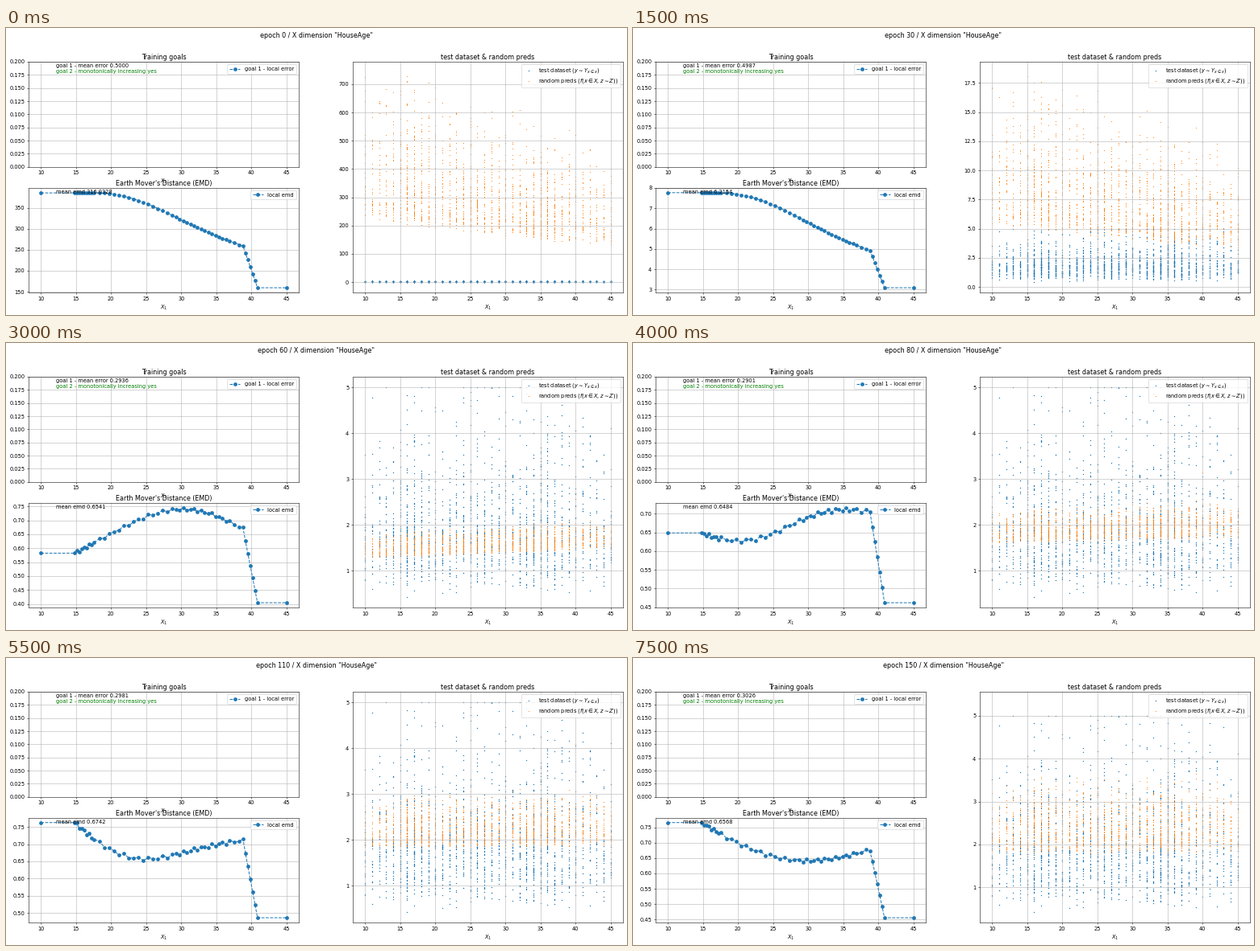
These frames come from a looping animation (770x357 px, 8000 ms). A matplotlib script:

```python
import numpy as np
import matplotlib.pyplot as plt
from matplotlib.animation import FuncAnimation

W, H, DPI = 770, 357, 48
FRAMES, STEP = 16, 10

# key epochs of the training run
KEYS = [0, 20, 30, 40, 60, 90, 130, 150]
ERROR = [.5, .4996, .4987, .4663, .2936, .2883, .3078, .3026]
EMD = [316.0328, 8.639, 6.2154, 1.3053, .6541, .6456, .7040, .6568]

# shape of the local EMD curve, relative to its mean
LEFT = [1.22, 1.25, 1.25, .965, .89, 1.055, 1.207, 1.165]
RIGHT = [.82, .793, .793, .99, 1.025, 1.12, .99, 1.03]
BEND = [.08, .085, .085, .12, .155, -.11, -.118, -.112]
WAVE = [.03, .033, .033, -.01, -.02, -.048, -.01, 0]
END = [.505, .498, .498, .555, .618, .759, .684, .694]

# predictions: centre, change with age, log spread
CENTRE = [280, 8.85, 6.95, .63, 1.58, 2.12, 2.35, 2.35]
TILT = [-.27, -.25, -.25, .11, .075, .02, 0, 0]
SPREAD = [.33, .33, .33, .20, .09, .10, .15, .17]


def at(values, epoch):
    return np.interp(epoch, KEYS, values)


def log_at(values, epoch):
    return np.exp(at(np.log(values), epoch))


def bump(x, centre, width):
    return np.exp(-((x - centre) / width) ** 2 / 2)


# markers sit at the means of sliding age windows
emd_x = np.concatenate([[10], np.linspace(14.75, 17.6, 9),
                        np.linspace(18.4, 28.76, 16),
                        np.linspace(29.27, 36.9, 16), [37.6, 38.3],
                        np.linspace(38.8, 40.87, 7), [45]])

# test set: more houses around ages 17, 26 and 35
rng = np.random.default_rng(7)
age = np.arange(10, 46)
count = (26 + 18 * np.sin(np.pi * (age - 10) / 35) + 40 * bump(age, 16.6, 1.3)
         + 15 * bump(age, 25.5, 1.2) + 40 * bump(age, 35, 1.5))
ages = np.repeat(age, count.astype(int))
prices = np.clip(1.9 * np.exp(.46 * rng.normal(size=ages.size)), .41, 5)
traits = rng.normal(size=ages.size)
stray = np.searchsorted(ages, 40)


def emd_curve(epoch):
    u = np.clip((emd_x - 14.75) / 24.05, 0, 1)
    left, right = at(LEFT, epoch), at(RIGHT, epoch)
    y = (left + (right - left) * u + at(BEND, epoch) * np.sin(np.pi * u)
         + at(WAVE, epoch) * np.sin(2 * np.pi * u))
    if epoch >= 40:
        y += .008 * np.sin(2.4 * np.arange(emd_x.size) + epoch) * (u % 1 > 0)
    drop = np.clip((emd_x - 38.8) / 2.07, 0, 1)
    y += (at(END, epoch) - right) * drop
    return y * log_at(EMD, epoch)


def predict(epoch):
    noise = np.random.default_rng(100 + epoch).normal(size=ages.size)
    z = 2.2 * np.tanh((.9 * traits + .44 * noise) / 2)
    z += .12 * z ** 2
    z[stray] = 4.8  # one house is rated far above the rest
    centre = log_at(CENTRE, epoch)
    slope = at(TILT, epoch) * (ages - 27.5) / 17.5
    y = centre * np.exp(slope + at(SPREAD, epoch) * z)
    return np.clip(y, prices.min(), 2.65 * centre)


def fit_y(ax, lo, hi):
    pad = .05 * (hi - lo)
    ax.set_ylim(lo - pad, hi + pad)


fig = plt.figure(figsize=(W / DPI, H / DPI), dpi=DPI, facecolor="white")


def panel(x0, y0, x1, y1, title):
    ax = fig.add_axes([x0 / W, 1 - y1 / H, (x1 - x0) / W, (y1 - y0) / H])
    ax.set_title(title, pad=4.5)
    ax.set_xlabel("$X_1$")
    ax.set_xlim(8.25, 46.75)
    ax.grid(True)
    return ax


def note(ax, y, text="", color="black"):
    return ax.text(.1, y, text, color=color, transform=ax.transAxes)


goals = panel(28, 42, 363, 172.8, "Training goals")
emd = panel(28, 198.8, 363, 329, "Earth Mover's Distance (EMD)")
data = panel(430, 42, 765, 329, "test dataset & random preds")

goals.plot([], [], "o--", label="goal 1 - local error")
goals.set_ylim(0, .2)
emd_line, = emd.plot([], [], "o--", label="local emd")
data.scatter(ages, prices, s=4, lw=0, color="C0",
             label=r"test dataset ($y \sim Y_{x \in x}$)")
dots = data.scatter(ages, prices, s=2, lw=0, color="C1",
                    label=r"random preds ($f(x \in X, z \sim Z)$)")
for ax in (goals, emd, data):
    ax.legend(loc="upper right")

heading = fig.suptitle("", y=.987)
error_text = note(goals, .945)
note(goals, .895, "goal 2 - monotonically increasing yes", "g")
emd_text = note(emd, .945)


def update(i):
    epoch = i * STEP
    heading.set_text(f'epoch {epoch} / X dimension "HouseAge"')
    error_text.set_text(f"goal 1 - mean error {at(ERROR, epoch):.4f}")
    emd_text.set_text(f"mean emd {log_at(EMD, epoch):.4f}")
    y = emd_curve(epoch)
    emd_line.set_data(emd_x, y)
    fit_y(emd, y.min(), y.max())
    preds = predict(epoch)
    dots.set_offsets(np.column_stack([ages, preds]))
    fit_y(data, prices.min(), max(5, preds.max()))
    return heading, error_text, emd_text, emd_line, dots


anim = FuncAnimation(fig, update, frames=FRAMES, interval=500,
                     repeat=True, repeat_delay=0)
plt.show()
```
